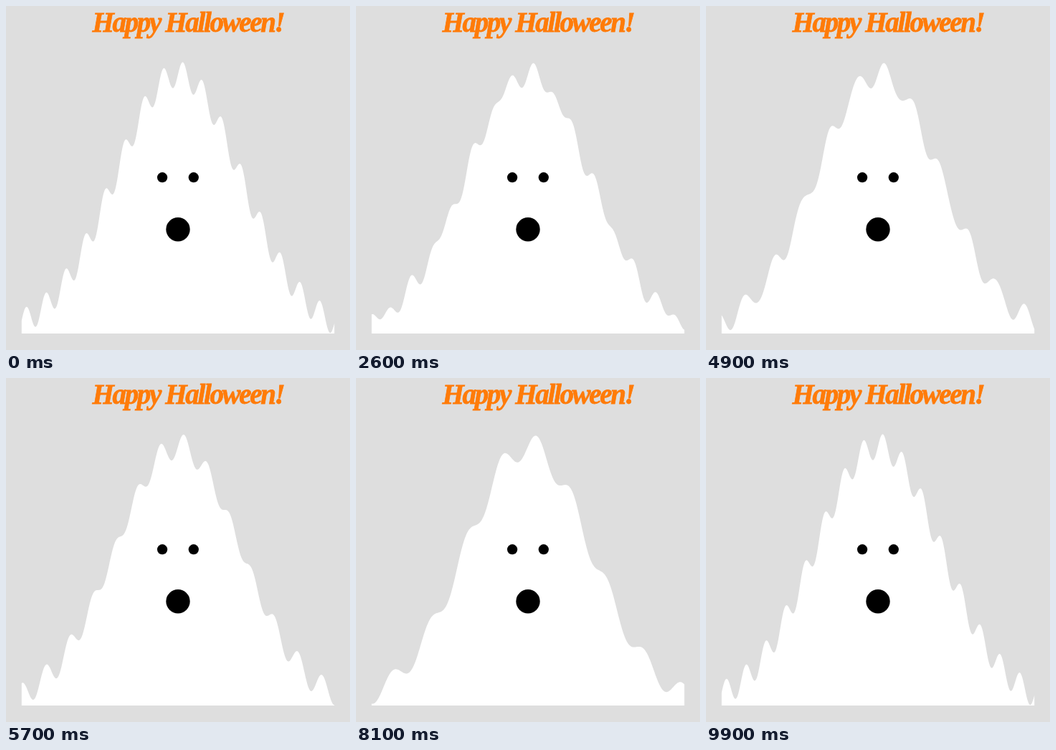
Recreate the animation shown at these times as an HTML page. Size 480 by 480 pixels, loop 10000 ms.

```html
<!DOCTYPE html>
<html lang="en">
<head>
<meta charset="utf-8">
<title>Happy Halloween!</title>
<style>
  html, body { margin: 0; width: 100%; height: 100%; overflow: hidden; background: #dedede; }
  svg { display: block; width: 100%; height: 100%; }
  text {
    font: italic bold 39px "Liberation Serif", "Times New Roman", serif;
    letter-spacing: -2.35px;
    fill: #ff7b08;
    stroke: #ff7b08;
    stroke-width: .8px;
  }
</style>
</head>
<body>
<svg viewBox="0 0 480 480">
  <text x="120.5" y="36">Happy Halloween!</text>
  <path id="ghost" fill="#fff"/>
  <circle cx="218.1" cy="239.2" r="7.1"/>
  <circle cx="261.8" cy="239.2" r="7.1"/>
  <circle cx="240" cy="311.7" r="16.7"/>
</svg>
<script>
  const TICK = 100, TICKS = 100;
  const UNIT = 87.27, HALF = 218.2, BASE = 456.9;
  const HEIGHT = 361.5, RIPPLE = 18.1;

  // Ripple frequency of each pose, and the ticks at which its morph to the next runs.
  const freqs = [20.06, 15.5, 12.48, 19.29, 22.21, 14.03, 17.1, 16.64, 10.89, 12.46];
  const starts = [0, 11, 21, 31, 41, 50, 60, 70, 80, 90];
  const ends = [10, 20, 30, 40, 50, 59, 69, 79, 89, 99];

  const ghost = document.getElementById('ghost');
  let shown = -1;

  function outline(a, b, mix) {
    let d = `M${240 - HALF} ${BASE}`;
    const steps = 436;
    for (let i = 0; i <= steps; i++) {
      const px = HALF * (2 * i / steps - 1);
      const x = px / UNIT;
      const bell = HEIGHT * Math.exp(-x * x / 2);
      const wave = (1 - mix) * Math.sin(a * x) + mix * Math.sin(b * x);
      d += `L${(240 + px).toFixed(2)} ${(BASE - bell - RIPPLE * wave).toFixed(2)}`;
    }
    return d + `L${240 + HALF} ${BASE}Z`;
  }

  function draw(now) {
    const tick = Math.floor(now / TICK) % TICKS;
    if (tick !== shown) {
      shown = tick;
      const i = starts.findLastIndex(s => s <= tick);
      const mix = Math.min(1, (tick - starts[i]) / (ends[i] - starts[i]));
      ghost.setAttribute('d', outline(freqs[i], freqs[(i + 1) % freqs.length], mix));
    }
    requestAnimationFrame(() => draw(performance.now()));
  }
  draw(0);
</script>
</body>
</html>
```
